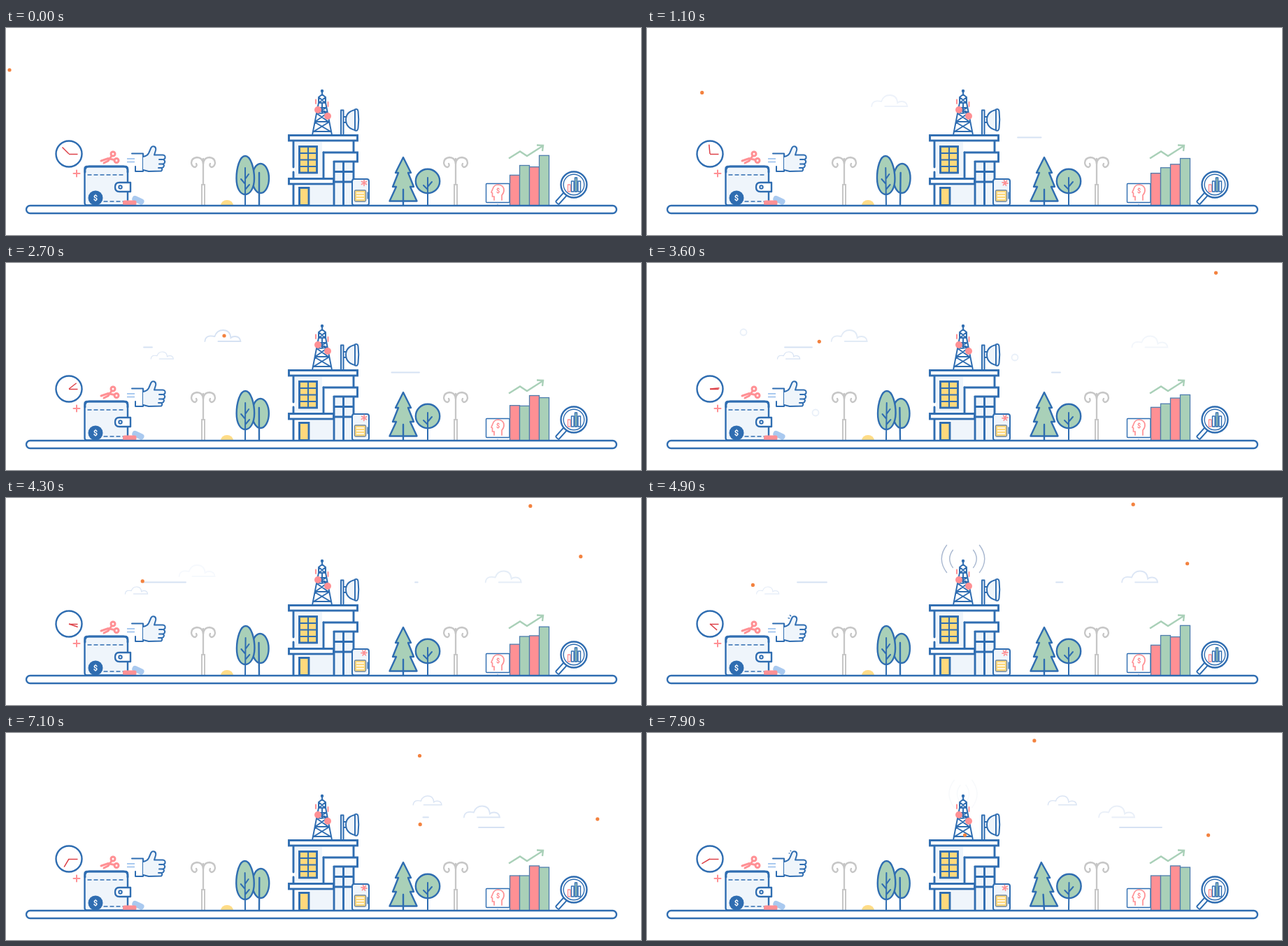
These frames come from a looping animation (908 px wide and 296 px high, 8 s). An HTML page:

```html
<!DOCTYPE html>
<html lang="en">
<head>
<meta charset="utf-8">
<title>Telecom street</title>
<style>
  html, body { margin: 0; width: 100%; height: 100%; overflow: hidden; background: #fff; }
  svg { display: block; }
  .ln { fill: none; stroke: #2f6db1; stroke-width: 2.4; stroke-linecap: round; stroke-linejoin: round; }
  .thin { stroke-width: 1.4; }
  .mid { stroke-width: 2; }
  .bold { stroke-width: 2.9; stroke-linejoin: miter; }
  .white { fill: #fff; }
  .pale { fill: #eff5fb; }
  .green { fill: #a9d0b8; }
  .yellow { fill: #ffd97c; }
  .pink { fill: #ff9094; }
  .pinkLn { fill: none; stroke: #ff9094; stroke-linecap: round; }
  .sky { fill: none; stroke: #d6e2f3; stroke-width: 1.8; stroke-linecap: round; }
  text { font: 700 11px Roboto, Arial, sans-serif; text-anchor: middle; }
</style>
</head>
<body>
<svg width="908" height="296" viewBox="0 0 908 296">
  <defs>
    <path id="cloud" class="sky" d="M19 16H51Q50 9 43 9Q39 9 37 11Q36 0 26 0Q17 0 14 9Q1 6 0 16"/>
    <path id="arm" d="M0 194Q-1 185 -9 185Q-17 186 -17 193Q-16 199 -11.500 199Q-8 197 -10 194"/>
    <g id="lamp" fill="none" stroke="#c6c6c6" stroke-width="2.300" stroke-linecap="round">
      <path d="M0 187V224"/>
      <use href="#arm"/><use href="#arm" transform="scale(-1 1)"/>
      <path d="M-2 253V224H2V253" stroke-width="2"/>
    </g>
  </defs>

  <g id="sky"></g>

  <!-- clock -->
  <circle class="ln" cx="90" cy="180" r="18.500"/>
  <g fill="none" stroke="#dd4249" stroke-width="1.500">
    <path d="M90 180.500H102.500"/>
    <path id="minute" d="M90 180V166.500"/>
  </g>
  <path class="pinkLn" stroke-width="2" d="M96.500 208h9M101 203.500v9"/>

  <!-- scissors -->
  <g class="pinkLn" stroke-width="3">
    <circle cx="153" cy="180" r="3"/><circle cx="158" cy="189.500" r="3"/>
    <path d="M151 183L146 190L140 193M155 188.500L146 186.500L136 190"/>
  </g>

  <!-- wallet and coins -->
  <rect class="ln pale" x="112.500" y="198" width="61.500" height="55.500" rx="3"/>
  <path class="ln bold" d="M113 206Q112 198 119 198H168Q175 198 174 206"/>
  <path class="ln thin" stroke-dasharray="5 4" d="M117 210H171M140 248H171"/>
  <path class="ln white" d="M178 221H162Q156 221 156 227.500Q156 234 162 234H178Z"/>
  <circle class="ln mid white" cx="163.500" cy="227.500" r="2.200"/>
  <circle cx="128" cy="243" r="10.500" fill="#2f6db1"/>
  <text x="128" y="247" fill="#fff">$</text>
  <rect x="180" y="242" width="18" height="8.500" rx="4" fill="#a9c9ef" transform="rotate(25 189 246)"/>
  <rect class="pink" x="167" y="246.500" width="19.500" height="7" rx="2.500"/>

  <!-- thumb up -->
  <path d="M173 187h11M173 191.500h11" stroke="#a9c9ef" stroke-width="2"/>
  <path class="ln mid" d="M180 179.500H196V205H185V198"/>
  <path class="ln mid pale" d="M196 184Q202 183 204 179L207.500 171Q209 168.500 212 169.500Q215 171 214 175L212 181.500H224
    Q228 182 227.500 185Q228 187 225 188Q228 190 227 192Q227 194 224 194.500Q227 196 225.500 198Q225 200 222 200
    Q224.500 202 222 204.500L204 205L196 203"/>
  <path class="ln mid" d="M219 188h5M219 194.500h4M218 200h4"/>
  <path id="sparks" class="ln thin"/>

  <use href="#lamp" x="282"/>
  <use href="#lamp" x="643"/>
  <path d="M307 254a9 8 0 0 1 18 0z" fill="#ffdc87"/>

  <!-- leafy trees -->
  <g id="rear" class="ln">
    <ellipse class="green" cx="364" cy="215" rx="12" ry="21"/>
    <path d="M362 207V254"/>
  </g>
  <g id="front" class="ln">
    <path class="green" d="M342 183C350 183 355 201 355 215C355 229 349 238 342 238C335 238 329.500 229 329.500 215C329.500 201 334 183 342 183Z"/>
    <path class="mid" d="M342 200V254M342 216L347 209M342 223L336 216M342 231L348 224"/>
  </g>

  <!-- tower -->
  <g class="ln mid">
    <circle cx="452" cy="90" r="1.200"/>
    <path d="M452 91V96M447 107V99L452 95L457 99V107ZM447 99L457 107M457 99L447 107
      M447 107L438 153M457 107L466 153M446 114L459 121L444 122L461 134H442L459 122M446 114H458L444 122
      M442 135L464 148M461 135L440 148M439 148H465M452 107V122"/>
  </g>
  <path class="pinkLn" stroke-width="2" d="M443 102.500V108M460.500 106V112"/>
  <circle class="pink" cx="446" cy="117" r="5"/>
  <circle class="pink" cx="460" cy="126" r="5"/>
  <g id="waves" fill="none" stroke="#7d94b8" stroke-width="1.400"></g>

  <!-- dish -->
  <g class="ln mid">
    <rect class="pale" x="479" y="117.500" width="3.500" height="36"/>
    <path class="pale" d="M499 117Q486 120 486 131Q486 143 499 146Z"/>
    <path class="white" d="M499 116.500Q503 115 503.500 119Q505 131 503.500 143Q503 148 499 146.500Z"/>
    <path d="M483 127H486M483 135H486"/>
  </g>

  <!-- building -->
  <path class="white" d="M411 161H497V254H411Z"/>
  <path class="pale" d="M413 163H452V213H413ZM435 225H467V253H435ZM470 193H496V253H470Z"/>
  <g class="ln bold">
    <path d="M411 161V199M411 206V254M497 161V254M454 215V178M469 191V254M482.500 191V254M469 205.500H496M469 220H496"/>
    <rect class="yellow" x="419.500" y="169.500" width="25" height="37.500"/>
    <path class="mid" d="M432 170V207M420 179H444M420 188.500H444M420 198H444"/>
    <rect class="yellow" x="419.500" y="228.500" width="13.500" height="25"/>
    <rect class="white" x="404.500" y="153.500" width="98" height="7.500"/>
    <path class="white" d="M454 178H502.500V191H469"/>
    <rect class="white" x="404.500" y="215.500" width="64" height="7.500"/>
  </g>

  <!-- cabinet -->
  <rect class="ln mid pale" x="495" y="216" width="24" height="37.500" rx="3"/>
  <rect class="yellow" x="498.500" y="232" width="16" height="16" rx="1.500" stroke="#6f86a0" stroke-width="1.300"/>
  <path d="M501 236h11M501 240h11M501 244h11" stroke="#fff" stroke-width="1.300"/>
  <path class="ln thin" d="M517 235V244"/>
  <path id="fan" class="pinkLn" stroke-width="1.700" d="M512 217.500v8M508.500 219.500l7 4M515.500 219.500l-7 4"/>

  <g id="pine" class="ln">
    <path class="green" d="M568 185L579 207H575L583 227H578L587.500 247.500H548.500L558 227H553L561 207H557Z"/>
    <path d="M568 231V254"/>
  </g>
  <g id="round" class="ln">
    <circle class="green" cx="603" cy="219" r="17.200"/>
    <path class="mid" d="M603 214V254M603 227L609 220M603 231L597 225"/>
  </g>

  <!-- card -->
  <rect class="ln thin white" x="686.500" y="222.500" width="33.500" height="27" rx="1"/>
  <path d="M703 250v4" stroke="#d6e2f3" stroke-width="2"/>
  <path class="pinkLn" stroke-width="1.700" d="M698 246V241H695.500V236L694 235L696 230Q698 224 704 224Q712 225 712 232Q712 236 709 239V246"/>
  <text x="703.500" y="236" fill="#ff8287" style="font-size:9px">$</text>

  <g id="bars" stroke="#4f7eae" stroke-width="1.300"></g>
  <path fill="none" stroke="#a9d0b8" stroke-width="2.400" d="M719 186.500L735 176.500L745 183L767 169M759 167.500L768 168L767 176"/>

  <!-- magnifier -->
  <g class="ln">
    <rect class="mid white" x="-3" y="0" width="6" height="18" rx="1.500" transform="translate(800 237) rotate(42)"/>
    <circle class="white" cx="812" cy="224" r="18.500"/>
    <circle class="thin" cx="812" cy="224" r="14.800"/>
    <g class="thin">
      <path class="white" stroke="#ff9094" d="M803.500 234V224h3.500v10z"/>
      <path class="white" d="M808.500 234V219h3.500v15z"/>
      <path class="green" d="M813.500 234V214h3v20z"/>
      <path class="white" d="M818 234V219h3.500v15z"/>
    </g>
  </g>

  <rect class="ln white" x="29" y="254" width="844" height="11" rx="5.500"/>
  <g id="dots" fill="#f3823f"></g>
</svg>

<script>
const LOOP = 8, STEP = .1; // seconds
const DOT_LIFE = 3, STREAK_TIME = 2, BURST_EVERY = 3.2;
const { PI, sin, cos, abs } = Math;
const $ = id => document.getElementById(id);
const set = (el, attrs) => { for (const k in attrs) el.setAttribute(k, attrs[k]); };
const clamp = v => Math.max(0, Math.min(1, v));

function add(parent, tag, attrs = {}) {
  const el = document.createElementNS('http://www.w3.org/2000/svg', tag);
  set(el, attrs);
  return $(parent).appendChild(el);
}

// start, life, x, y, speed, size
const clouds = [
  [.5, 4.1, 335, 96, -23, 1],
  [1.1, 5, 244, 127, -23, .63],
  [3, 6, 700, 104.5, -11, 1],
  [6.3, 2.4, 591, 90, -11, .8]
].map(c => [add('sky', 'use', { href: '#cloud' }), ...c]);

// start, left, y, length
const streaks = [[0, 530, 156.5, 61], [2.3, 197, 120.5, 60], [3.9, 585, 120.5, 19], [5.9, 676, 135, 60]]
  .map(s => [add('sky', 'path', { class: 'sky' }), ...s]);

const rings = [[138, 99], [526, 135], [241, 214]]
  .map(([cx, cy]) => add('sky', 'circle', { class: 'sky', cx, cy, r: 4.5 }));

// start, x, y, speed across, speed down
const dots = [
  [0, 5, 60, -55, -10],
  [1, 86, 93, -73, -5.6],
  [2.7, 312, 104, -73, 9.3],
  [3.1, 859, 16, -91, -3.8],
  [4.2, 830, 82, -82, 16.8],
  [5.6, 662, 73, -47, -27],
  [6.3, 889, 100, -54, 28.8],
  [7.6, 480, 144, -85, 7]
].map(d => [add('dots', 'circle', { r: 2.6 }), ...d]);

const bars = [0, 1, 2, 3].map(i =>
  add('bars', 'rect', { class: i % 2 ? 'green' : 'pink', x: 720.5 + i * 14, width: 14 }));

const waves = [0, 1].map(() => add('waves', 'path'));
const spin = (id, deg, x, y) => set($(id), { transform: `rotate(${deg} ${x} ${y})` });
const lean = (id, deg) => set($(id), { transform: `translate(0 254) skewX(${-deg}) translate(0 -254)` });

function drawSky(t) {
  for (const [el, start, life, x, y, speed, size] of clouds) {
    const age = t - start;
    set(el, {
      opacity: sin(PI * clamp(age / life)),
      transform: `translate(${x + speed * age} ${y}) scale(${size})`
    });
  }
  for (const [el, start, x, y, length] of streaks) {
    const age = (t - start) / STREAK_TIME, head = clamp(age), tail = clamp(age - 1);
    set(el, { d: head > tail ? `M${x + length * tail} ${y}H${x + length * head}` : '' });
  }
  const glow = clamp(1 - abs(t % 2.3 - 1.45) / .32);
  rings.forEach(el => set(el, { opacity: glow }));
  for (const [el, start, x, y, vx, vy] of dots) {
    const age = t - start;
    set(el, { cx: x + vx * age, cy: y + vy * age, opacity: age >= 0 && age < DOT_LIFE ? 1 : 0 });
  }
}

// Radio waves over the tower and sparks over the thumb share one beat.
function drawBurst(t) {
  const age = (t + 2) % BURST_EVERY;
  const fade = clamp(Math.min((age - .28) / .25, (.95 - age) / .4));
  waves.forEach((el, i) => {
    const h = (i ? 13 : 20) - clamp(age * 5 - 2.5) * (i ? 2 : 5);
    const r = 4 + 53.5 * age - i * 11.5, sag = h * .38;
    const side = s => `M${452 + s * (r - sag)} ${87 - h}q${s * sag * 2} ${h} 0 ${2 * h}`;
    set(el, { d: side(-1) + side(1), opacity: fade * .75 });
  });

  const grow = clamp((age - .2) * 2);
  const count = age < .2 || age > .95 ? 0 : grow > .9 ? 6 : 2;
  let rays = '';
  for (let i = 0; i < count; i++) {
    const a = (i * 30 - 165) * PI / 180;
    const at = r => `${211 + r * cos(a)} ${174 + r * sin(a)}`;
    rays += `M${at(7.5)}L${at(7.5 + grow * 3)}`;
  }
  set($('sparks'), { d: rays });
}

function draw(t) {
  const swing = 2 * PI * t / 5;
  drawSky(t);
  drawBurst(t);
  bars.forEach((el, i) => {
    const y = 207 - 6.5 * i + (3.4 + .6 * i) * (i % 2 ? -1 : 1) * cos(swing);
    set(el, { y, height: 254 - y });
  });

  const gust = t > 4.9 ? sin((t - 4.9) / 2.2 * PI) : 0;
  spin('minute', 36 * t - 45, 90, 180);
  spin('fan', 90 * t, 512, 221.5);
  lean('pine', 3.8 * gust);
  lean('round', -.8 * gust);
  lean('front', -.8 * sin(swing));
  lean('rear', .8 * sin(swing));
}

const begin = performance.now();
function tick() {
  const t = (performance.now() - begin) / 1000 % LOOP;
  draw(Math.floor(t / STEP + 1e-6) * STEP);
  requestAnimationFrame(tick);
}
tick();
</script>
</body>
</html>
```
